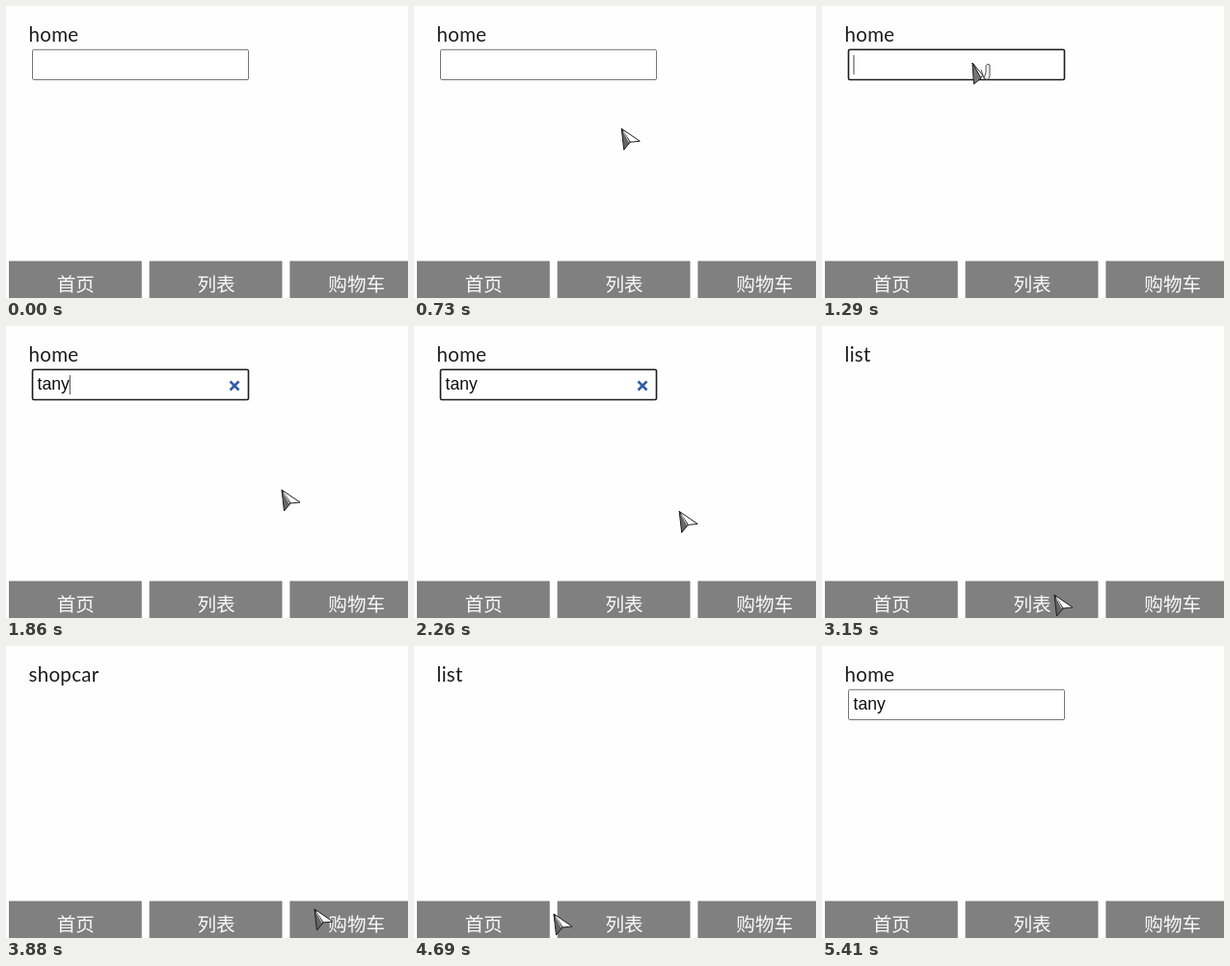
Animation of 417 by 303 pixels, one loop 5.98 s. Source, as an HTML page:

```html
<!DOCTYPE html>
<html lang="zh">
<head>
<meta charset="utf-8">
<title>Tabs</title>
<style>
  html, body { margin: 0; width: 100%; height: 100%; overflow: hidden; background: #fefefe; }
  svg { display: block; width: 100%; height: 100%; }
  #title { font: 20.5px Lato, "Open Sans", sans-serif; letter-spacing: .3px; fill: #1c1c1c; }
  #typed { font: 17.6px "Liberation Sans", Arial, sans-serif; fill: #111; }
  #box { fill: #fff; stroke: #767676; }
  #box.active { stroke: #1c1c1c; stroke-width: 1.6; }
  #tabs rect { fill: #808080; }
  #tabs text { font: 500 19.6px "Noto Sans CJK SC", "Noto Sans CJK", sans-serif; fill: #fafafa; text-anchor: middle; }
</style>
</head>
<body>
<svg viewBox="0 0 417 303">
  <text id="title" x="23.5" y="37.3"></text>
  <g id="field">
    <rect id="box" x="27.5" y="45.3" width="224" height="31.2" rx="1.5"/>
    <text id="typed" x="32.5" y="66"></text>
    <path id="caret" d="M.5 51v20" stroke="#444"/>
    <path id="clear" d="M232.5 57.5l9 9m0-9l-9 9" stroke="#315aa5" stroke-width="2.6"/>
  </g>
  <g id="tabs"></g>
  <g id="cursor" stroke="#1c1c1c" stroke-linejoin="round">
    <g id="plane">
      <path d="M0 0L19 13L9 14Z" fill="#fff"/>
      <path d="M0 0L2.5 22L9 14Z" fill="#666"/>
      <path d="M2 3L8 14" stroke="#ddd"/>
    </g>
    <g id="press">
      <path d="M0 0L11 13L8 16Z" fill="#fff"/>
      <path d="M0 0L1.5 22L9 16Z" fill="#777"/>
      <path d="M9 7L12 16Q17 19 18 14V2Q16 0 14 3V10L12 16" fill="#eee" stroke="#555"/>
    </g>
  </g>
</svg>
<script>
const LOOP = 5980;
const STEP = 80;
const $ = id => document.getElementById(id);

const pages = [
  { from: 0, name: 'home' },
  { from: 3070, name: 'list' },
  { from: 3800, name: 'shopcar' },
  { from: 4440, name: 'list' },
  { from: 5090, name: 'home' }
];

// The cursor enters from below, makes these moves and leaves below.
const entry = { x: 290, y: 310 };
const moves = [
  { from: 240, to: 510, x: 235, y: 150 },
  { from: 730, to: 970, x: 156, y: 59 },
  { from: 1370, to: 1860, x: 286, y: 170 },
  { from: 2260, to: 2590, x: 232, y: 282 },
  { from: 2750, to: 2830, x: 241, y: 279 },
  { from: 3320, to: 3560, x: 320, y: 273 },
  { from: 3960, to: 4200, x: 215, y: 282 },
  { from: 4520, to: 4930, x: 75, y: 274 },
  { from: 5250, to: 5410, x: 110, y: 310 }
];

const within = (t, from, to) => t >= from && t < to;
const clamp = (value, low, high) => Math.max(low, Math.min(high, value));
const show = (id, on) => $(id).setAttribute('visibility', on ? 'visible' : 'hidden');
const shift = (id, x, y) => $(id).setAttribute('transform', `translate(${x} ${y})`);

$('tabs').innerHTML = ['首页', '列表', '购物车'].map((label, i) => {
  const x = 3 + 145.7 * i;
  return `<rect x="${x}" y="264.6" width="137.8" height="39"/>
    <text x="${x + 69.3}" y="295.6">${label}</text>`;
}).join('');

// Advance each move in equal hard steps, the first one at its start.
function cursorAt(t) {
  let { x, y } = entry;
  for (const move of moves) {
    if (t < move.from) break;
    const span = move.to - move.from;
    const count = Math.round(span / STEP);
    const done = Math.min(count, Math.floor((t - move.from) / span * count + .01));
    const k = (done + 1) / (count + 1);
    x += (move.x - x) * k;
    y += (move.y - y) * k;
  }
  return [x, y];
}

function draw(t) {
  const page = pages.filter(p => p.from <= t).pop().name;
  const home = page === 'home';
  const active = within(t, 1290, 2590);
  const typed = clamp(Math.floor((t - 1370) / STEP), 0, 4);
  const pressed = within(t, 1290, 1370) || within(t, 2590, 2910);

  $('title').textContent = page;
  $('typed').textContent = 'tany'.slice(0, typed);
  $('box').classList.toggle('active', active);
  $('field').style.display = home ? '' : 'none';
  show('clear', active && typed > 0);
  show('caret', active && t < 2260);
  shift('caret', 32.5 + $('typed').getComputedTextLength(), 0);
  show('plane', !pressed);
  show('press', pressed);
  shift('cursor', ...cursorAt(t));
}

function tick() {
  draw(performance.now() % LOOP);
  requestAnimationFrame(tick);
}
tick();
</script>
</body>
</html>
```
